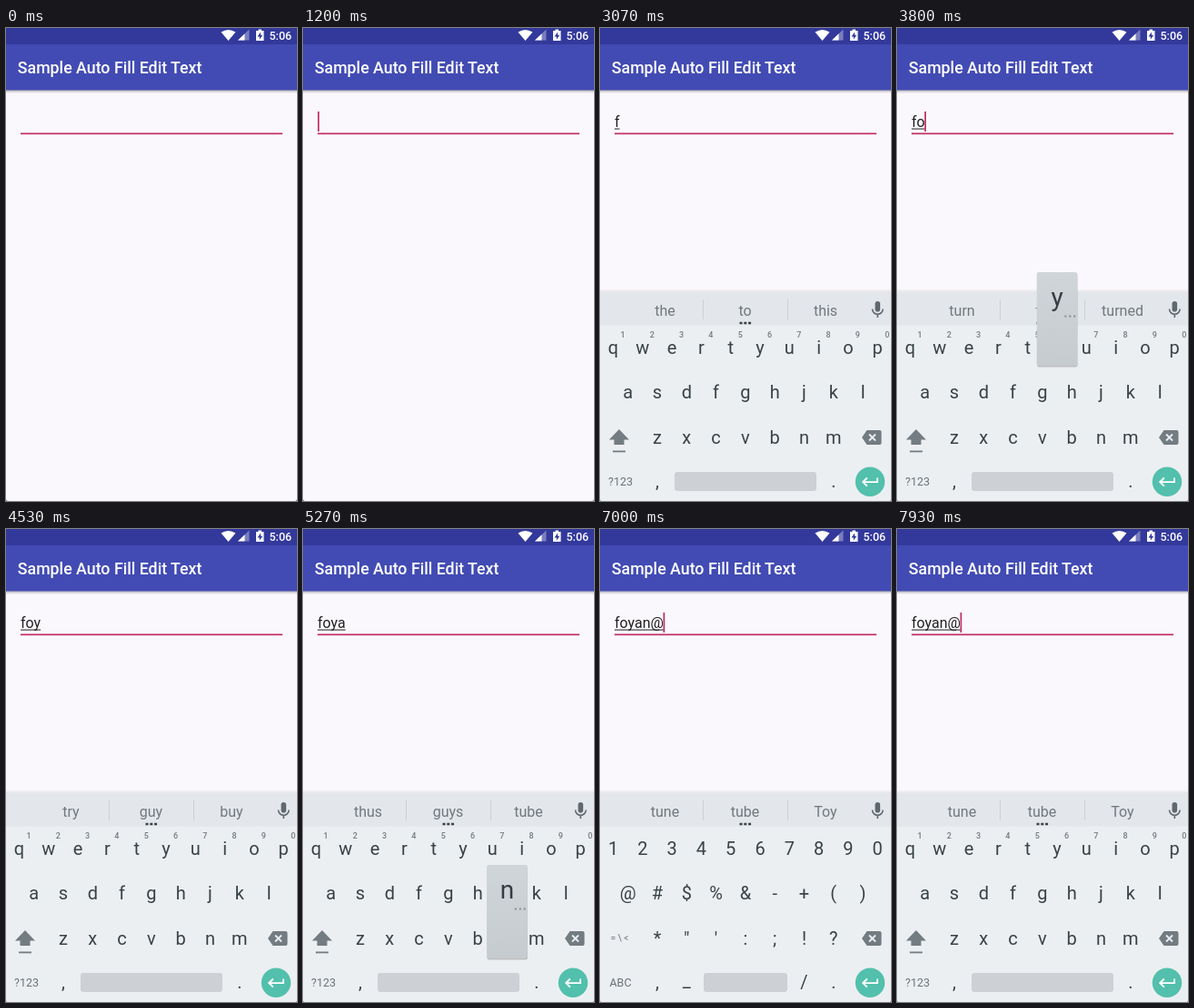
Animation, 320 px wide and 521 px high, one loop 8 s. Source, as an HTML page:

```html
<!DOCTYPE html>
<html lang="en">
<head>
<meta charset="utf-8">
<title>Auto fill edit text</title>
<style>
html, body { margin: 0; width: 100%; height: 100%; overflow: hidden; background: #55555a; }
svg { display: block; width: 100%; height: 100%; border-radius: 0 0 2px 2px; font-family: Roboto, sans-serif; }
.mid { text-anchor: middle; }
.key { font-size: 20px; fill: #394246; }
.hint { font-size: 9px; font-weight: 500; fill: #737b80; }
.fn { font-size: 12.5px; fill: #697277; }
.word { font-size: 16px; fill: #70787d; }
</style>
</head>
<body>
<svg viewBox="0 0 320 521" xmlns="http://www.w3.org/2000/svg">
  <defs>
    <linearGradient id="drop" x2="0" y2="1">
      <stop stop-color="#000" stop-opacity=".3"/><stop offset="1" stop-color="#000" stop-opacity="0"/>
    </linearGradient>
    <linearGradient id="rise" x2="0" y2="1">
      <stop stop-color="#000" stop-opacity="0"/><stop offset="1" stop-color="#000" stop-opacity=".1"/>
    </linearGradient>
    <linearGradient id="bubble" x2="0" y2="1">
      <stop stop-color="#d0d5d9"/><stop offset="1" stop-color="#c6cbcf"/>
    </linearGradient>
  </defs>
  <rect width="320" height="521" fill="#faf8fc"/>
  <rect y="68" width="320" height="4" fill="url(#drop)"/>
  <rect width="320" height="68.5" fill="#424bb3"/>
  <rect width="320" height="18" fill="#33399b"/>
  <g fill="#fff">
    <path d="M236.5 4.6Q244.500 -.6 252.500 4.600L244.500 14Z"/>
    <path d="M267.500 1.500V13.500H255Z" opacity=".35"/>
    <path d="M262.500 6.300V13.500H255Z"/>
    <path d="M275 3h2.500v-1.500h3.500v1.500h2.500v11h-8.500z"/>
    <path d="M280 4.500l-3.500 5h2.300v3.300l3.400-5h-2.200z" fill="#33399b"/>
    <text x="289.500" y="13" font-size="12.500" font-weight="500">5:06</text>
    <text x="12.800" y="50.300" font-size="17.780" font-weight="500">Sample Auto Fill Edit Text</text>
  </g>
  <rect x="16" y="115.500" width="288" height="1.700" fill="#c12c61"/>
  <text id="input" x="16" y="109.300" font-size="16" fill="#202020"></text>
  <rect id="underline" x="16" y="110.600" height="1" fill="#202020"/>
  <rect id="cursor" y="92" width="1.700" height="22" fill="#c12c61"/>
  <g id="keyboard">
    <rect y="287" width="320" height="5" fill="url(#rise)"/>
    <rect y="291.500" width="320" height="230" fill="#eceff2"/>
    <rect y="291.500" width="320" height="36" fill="#e3e6ea"/>
    <path d="M113.500 299V321M206.500 299V321" stroke="#ccd1d5"/>
    <g fill="#5f686d">
      <rect x="302.500" y="301" width="5.600" height="11.500" rx="2.800"/>
      <path d="M299.500 309.500a5.800 5.800 0 0 0 11.600 0M305.300 315.500v3.500" fill="none" stroke="#5f686d" stroke-width="1.600"/>
    </g>
    <g id="words"></g>
    <g id="letters"></g>
    <g id="symbols"></g>
    <path d="M288 451l5.500-8h14q2 0 2 2v12q0 2-2 2h-14z" fill="#737c81"/>
    <path d="M296 447.500l7 7M303 447.500l-7 7" stroke="#eceff2" stroke-width="1.800"/>
    <circle cx="297" cy="499.700" r="16.200" fill="#52c0ac"/>
    <path d="M305 495.500v4.600h-15.500M293.800 495.500l-4.600 4.600 4.600 4.600" fill="none" stroke="#fff" stroke-width="1.900"/>
  </g>
  <g id="popup">
    <rect x="-22" y="1.500" width="44.500" height="103" rx="2" fill="#000" opacity=".2"/>
    <rect x="-22.300" width="44.600" height="103" rx="2" fill="url(#bubble)"/>
    <text id="popupKey" class="mid" y="37" font-size="28" fill="#343d41"></text>
    <path id="more" d="M8.300 48.500h2M13.300 48.500h2M18.200 48.500h2" stroke="#858d92" stroke-width="2"/>
  </g>
</svg>
<script>
const $ = id => document.getElementById(id);
const PITCH = 32.3, BASELINES = [359, 408, 457.5, 506];
const LETTERS = ['qwertyuiop', 'asdfghjkl', 'zxcvbnm'];
const SYMBOLS = ['1234567890', '@#$%&-+()', '*"\':;!?'];
const STARTS = [14.5, 30.7, 63];
const HAS_MORE = 'yuoeatn';

const escape = s => s.replace(/&/g, '&amp;').replace(/</g, '&lt;');
const label = (s, x, y, cls) => `<text class="mid ${cls}" x="${x}" y="${y}">${escape(s)}</text>`;
const keyRows = rows => rows.map((row, r) => [...row].map((c, i) =>
  label(c, STARTS[r] + i * PITCH, BASELINES[r], 'key')).join('')).join('');
const bottomRow = (name, spaceX, spaceW, extra) =>
  `<rect class="pressed" x="1" y="481" width="43" height="37" fill="#cdd3d7"/>` +
  label(name, 22.5, 504, 'fn') + label(',', 63, 506, 'key') + label('.', 257, 506, 'key') +
  `<rect x="${spaceX}" y="489" width="${spaceW}" height="21" rx="3" fill="#cdd1d5"/>` + extra;

$('letters').innerHTML = keyRows(LETTERS) +
  [...'1234567890'].map((n, i) => label(n, 25 + i * PITCH, 341, 'hint')).join('') +
  '<path d="M21 442l11 11.500h-5.500v5.500h-11v-5.500h-5.500z" fill="#737c81"/>' +
  '<rect x="14" y="465.500" width="14" height="1.800" fill="#737c81"/>' +
  bottomRow('?123', 82, 156, '');
$('symbols').innerHTML = keyRows(SYMBOLS) +
  '<text class="mid fn" x="21.500" y="454" style="font-size:10px">= \\ &lt;</text>' +
  bottomRow('ABC', 114, 92, label('_', 95.300, 504, 'key') + label('/', 224.500, 506, 'key'));

// Key down, key up, key, suggestions that follow
const PRESSES = [
  [2470, 2570, 'f', 'the', 'to', 'this'],
  [3300, 3400, 'o', 'turn', 'tu', 'turned'],
  [3790, 3900, 'y', 'try', 'guy', 'buy'],
  [4665, 4740, 'a', 'thus', 'guys', 'tube'],
  [5200, 5330, 'n', 'guyed', 'Guyenne', 'thyme'],
  [6730, 6830, '@', 'tune', 'tube', 'Toy']
];
const LOOP = 8000, WORD_DELAY = 100, POPUP_LINGER = 50;
const TAP = 1600, SLIDE = [1450, 1660];
const SYMBOLS_ON = 6060, SYMBOLS_OFF = 7460, SWITCH_HOLD = 130;
const BLINK_STARTS = [65, TAP, ...PRESSES.map(p => p[1])];

const show = (el, on) => { el.style.display = on ? '' : 'none'; };
const within = (t, start, length) => t >= start && t < start + length;

function keyCenter(key) {
  for (const rows of [LETTERS, SYMBOLS]) {
    const row = rows.findIndex(r => r.includes(key));
    if (row >= 0) return { x: STARTS[row] + rows[row].indexOf(key) * PITCH, row };
  }
}

let shownWords;
function drawWords(words) {
  const id = words.join();
  if (id === shownWords) return;
  shownWords = id;
  $('words').innerHTML = words.map((w, i) => label(w, [71.5, 159.5, 248][i], 316.5, 'word')).join('') +
    (words.length ? '<path d="M153.500 325h3M158.300 325h3M163.100 325h3" stroke="#394246" stroke-width="2.600"/>' : '');
}

function drawText(t) {
  const input = $('input');
  input.textContent = PRESSES.filter(p => t >= p[1]).map(p => p[2]).join('');
  const width = input.textContent ? input.getComputedTextLength() : 0;
  $('underline').setAttribute('width', width);
  $('cursor').setAttribute('x', 16.2 + Math.max(0, width - 0.6));
  const start = BLINK_STARTS.filter(s => s <= t).pop() ?? BLINK_STARTS[0];
  show($('cursor'), (t - start + 1000) % 1000 < 500);
}

function drawPopup(t) {
  const press = PRESSES.find(p => t >= p[0] && t < p[1] + POPUP_LINGER);
  show($('popup'), press);
  if (!press) return;
  const { x, row } = keyCenter(press[2]);
  $('popup').setAttribute('transform', `translate(${x} ${269 + row * 50.5})`);
  $('popupKey').textContent = press[2];
  show($('more'), HAS_MORE.includes(press[2]));
}

function drawKeyboard(t) {
  const p = Math.min(1, Math.max(0, (t - SLIDE[0]) / (SLIDE[1] - SLIDE[0])));
  const eased = 1 - (1 - p) ** 2;
  const keyboard = $('keyboard');
  show(keyboard, p > 0);
  keyboard.setAttribute('opacity', eased);
  keyboard.setAttribute('transform', `translate(0 ${46 * (1 - eased)})`);
  const symbols = t >= SYMBOLS_ON && t < SYMBOLS_OFF;
  show($('symbols'), symbols);
  show($('letters'), !symbols);
  const held = within(t, SYMBOLS_ON, SWITCH_HOLD) || within(t, SYMBOLS_OFF, SWITCH_HOLD);
  document.querySelectorAll('.pressed').forEach(el => show(el, held));
  const latest = PRESSES.filter(q => t >= q[1] + WORD_DELAY).pop();
  drawWords(latest ? latest.slice(3) : []);
}

const origin = performance.now();
function frame() {
  const t = (performance.now() - origin) % LOOP;
  drawText(t);
  drawKeyboard(t);
  drawPopup(t);
  requestAnimationFrame(frame);
}
frame();
</script>
</body>
</html>
```
